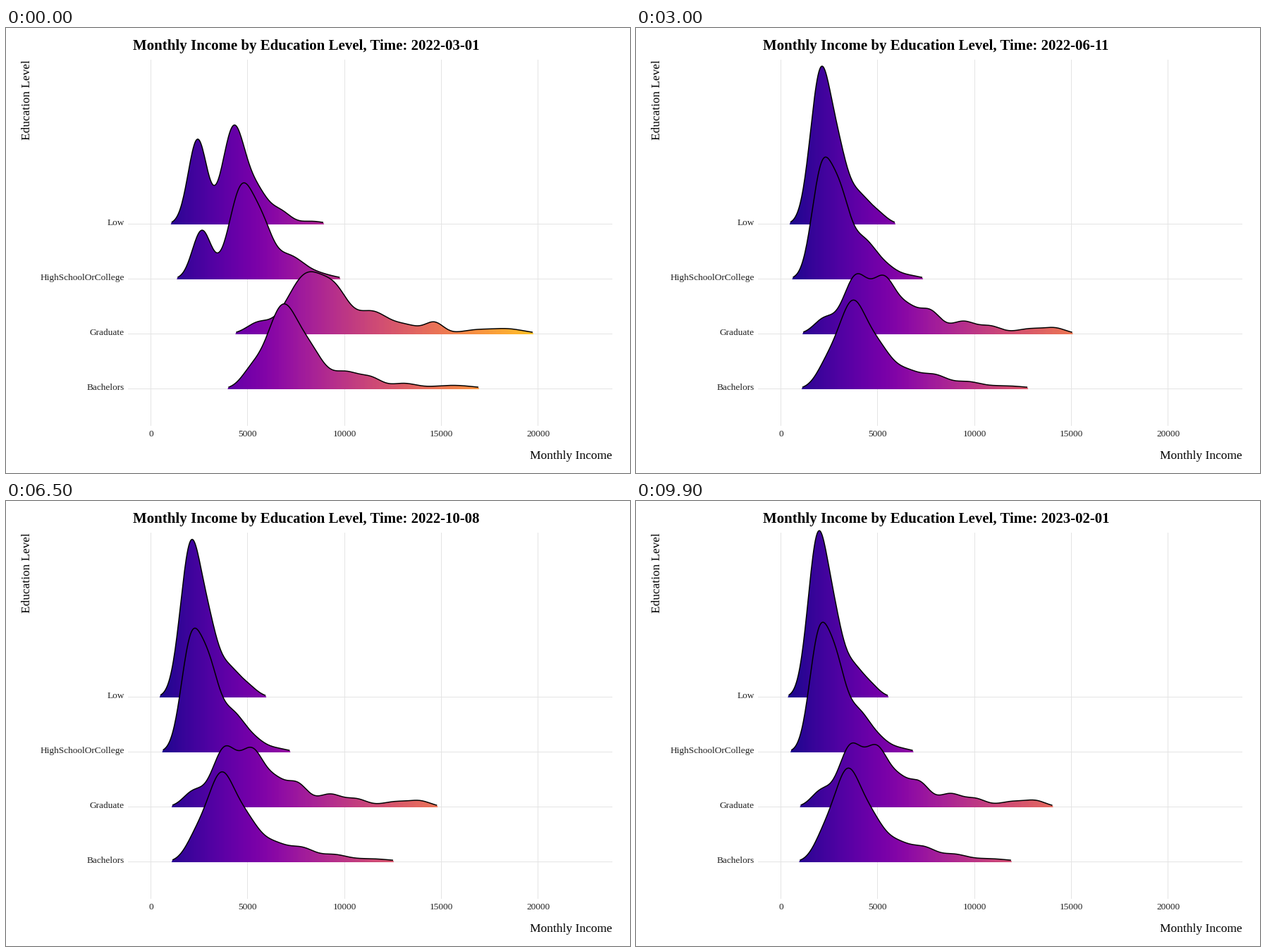
Write a matplotlib script that moves like this. It is 885x632 px and loops after 10000 ms.

```python
import numpy as np
import matplotlib.pyplot as plt
from matplotlib.animation import FuncAnimation
from matplotlib.path import Path

W, H, DPI = 885, 632, 100
FRAMES, INTERVAL = 100, 100
START, SPAN = np.datetime64("2022-03-01"), 337
X_ZERO, X_STEP = 205.7, 137.25     # pixel of income 0, pixels per 5000
Y_FIRST, Y_STEP = 278.5, 78        # first baseline, distance between baselines
LEFT, RIGHT = 204.3, 828.8         # extent of the density grid
MIN_HEIGHT = 2.3                   # lower parts of a density are hidden
GRID = np.linspace(LEFT, RIGHT, 512)
GREY, TICK = "#e4e4e4", "#222222"

# The densities fade linearly between the first state and the drifting ones
DAYS = [0, 31, 34, 102, 177, 184, 214, 221, 296, 306, SPAN]
STATES = [0, 1, 1, 2, 3, 3, 4, 4, 5, 5, 6]

# How far incomes have moved in each later state
LOW_DRIFT = [1, 1.008, 1.01, 1.01, 1.02, 0.935]
DRIFT = [1, 1.025, 1.045, 1.006, 1.033, 0.952]
SPREAD = 0.6                       # widths follow the drift less than centres

# Each density is a sum of bumps (centre, width, height) in pixels
RIDGES = {
    "Low": (
        [(66, 13.3, 120), (117, 15.8, 135), (150, 16, 44), (184, 14, 16.5),
         (228, 16, 4)],
        [(55.7, 14.5, 214), (81, 12.5, 76), (108, 16, 41), (137, 13, 12)],
        LOW_DRIFT),
    "HighSchoolOrCollege": (
        [(72, 13.3, 68.5), (129, 18, 130), (159, 14, 50), (194, 22, 33),
         (240, 20, 6)],
        [(56, 14, 148), (81, 14, 103), (114, 18, 54), (147, 15, 13),
         (178, 15, 4.5)],
        DRIFT),
    "Graduate": (
        [(151, 16, 14), (222, 28, 85), (264, 18, 39), (313, 22, 31),
         (362, 20, 11.5), (402, 13, 15.5), (458, 20, 4.7), (504, 25, 7.3)],
        [(60, 14.5, 21.5), (103, 17, 80), (143, 17.5, 78), (177, 14, 28),
         (206, 15, 32), (252, 17, 18), (290, 15, 10.5), (345, 20, 7.5),
         (380, 15, 7.5)],
        DRIFT),
    "Bachelors": (
        [(142, 15, 21), (187, 22, 117), (228, 18, 42), (276, 20, 23.5),
         (313, 15, 13), (358, 18, 7.5), (428, 30, 5)],
        [(63, 15, 28.5), (98, 19, 118), (135, 19, 53), (175, 18, 22),
         (213, 18, 18.5), (257, 18, 9), (308, 30, 4.4)],
        DRIFT),
}


def pt(px):
    return px * 72 / DPI


def density(bumps, drift=1):
    """Sum of Gaussian bumps; drifting keeps their area."""
    centre, width, height = np.array(bumps).T[..., None]
    spread = drift ** SPREAD
    z = (GRID - X_ZERO - centre * drift) / (width * spread)
    return (height / spread * np.exp(-z * z / 2)).sum(axis=0)


plt.rcParams["font.family"] = "Liberation Serif"
fig = plt.figure(figsize=(W / DPI, H / DPI), dpi=DPI, facecolor="white")
ax = fig.add_axes([0, 0, 1, 1])
ax.axis("off")


def label(x, y, text, px, ha="left", **kw):
    return ax.text(x, y, text, fontsize=pt(px), ha=ha, va="baseline", **kw)


def grid_line(x, y):
    ax.plot(x, y, color=GREY, lw=pt(1), zorder=0, solid_capstyle="butt",
            snap=False)


class Ridge:
    def __init__(self, row, name, first, later, drifts):
        self.base = Y_FIRST + row * Y_STEP
        self.heights = [density(first)] + [density(later, d) for d in drifts]
        ramp = plt.get_cmap("plasma")(np.linspace(0, 1, len(GRID)))[None]
        self.fill = ax.imshow(ramp, extent=(LEFT, RIGHT, self.base + 1, 40),
                              aspect="auto", interpolation="nearest",
                              zorder=row + 1)
        self.line, = ax.plot([], [], color="black", lw=pt(1.5), zorder=row + 1.5,
                             solid_joinstyle="round", solid_capstyle="butt")
        grid_line([173, 860], [self.base] * 2)
        label(168, self.base + 1.5, name, 13.4, "right", color=TICK)

    def update(self, state):
        a = int(state)
        b = min(a + 1, len(self.heights) - 1)
        h = self.heights[a] + (state - a) * (self.heights[b] - self.heights[a])
        shown = h >= MIN_HEIGHT
        self.line.set_data(GRID, np.where(shown, self.base - h, np.nan))
        floor = self.base + 0.5
        top = np.where(shown, self.base - h, floor)
        outline = np.column_stack([np.r_[LEFT, GRID, RIGHT], np.r_[floor, top, floor]])
        self.fill.set_clip_path(Path(outline), ax.transData)


for n in range(5):
    x = X_ZERO + n * X_STEP
    grid_line([int(x) + 0.5] * 2, [45, 565])
    label(x, 580.5, str(5000 * n), 13.4, "center", color=TICK)

ridges = [Ridge(row, name, *spec) for row, (name, spec) in enumerate(RIDGES.items())]

title = label(180, 30.5, "", 20.85, weight="bold")
label(860, 611.5, "Monthly Income", 17.4, "right")
label(34.5, 45, "Education Level", 17.2, "right", rotation=90, rotation_mode="anchor")
ax.set_xlim(0, W)
ax.set_ylim(H, 0)


def draw(i):
    day = SPAN * i / (FRAMES - 1)
    title.set_text(f"Monthly Income by Education Level, Time: {START + int(day)}")
    state = np.interp(day, DAYS, STATES)
    for ridge in ridges:
        ridge.update(state)


anim = FuncAnimation(fig, draw, frames=FRAMES, interval=INTERVAL,
                     repeat=True, repeat_delay=0, blit=False)
plt.show()
```
